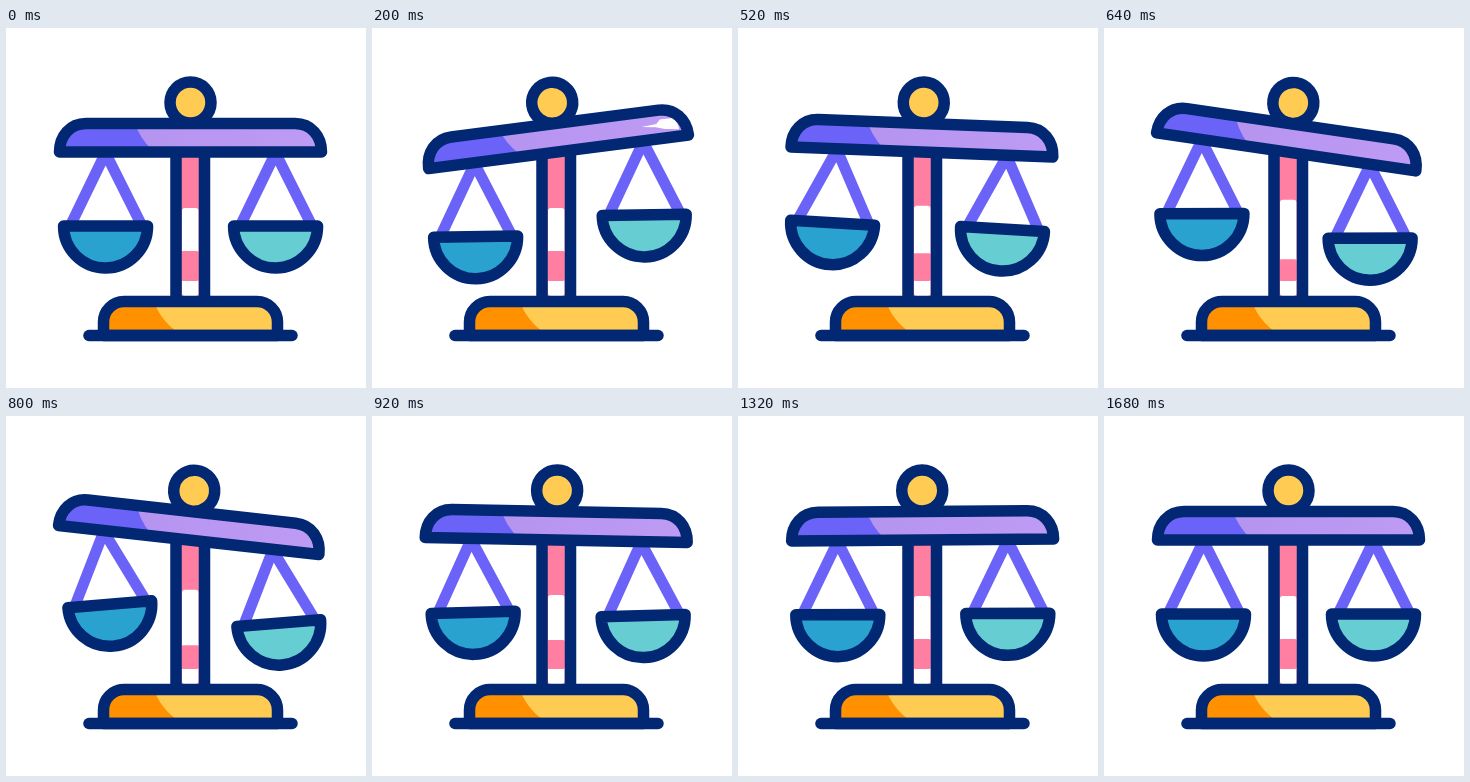
Animation of 360x360 px, one loop 1720 ms. Source, as an HTML page:

```html
<!DOCTYPE html>
<html lang="en">
<head>
<meta charset="utf-8">
<title>Balance scale</title>
<style>
  html, body { margin: 0; width: 100%; height: 100%; overflow: hidden; background: #fff; }
  svg { display: block; width: 100vw; height: 100vh; }
  .line { stroke: #022873; stroke-width: 11.5; stroke-linejoin: round; stroke-linecap: round; }
  .string { fill: none; stroke: #6b63f8; stroke-width: 11; }
</style>
</head>
<body>
<svg viewBox="0 0 360 360">
  <defs>
    <linearGradient id="lilac"><stop offset=".3" stop-color="#b594f0"/><stop offset="1" stop-color="#be9bf4"/></linearGradient>
    <clipPath id="beamClip"><path id="beamShape" d="M53.5 124C53.5 108 64 95.5 80 95.5H289C305 95.5 315.5 108 315.5 124Z"/></clipPath>
    <clipPath id="baseClip"><path id="baseShape" d="M97.5 307.5V294A20.5 20.5 0 0 1 118 273.5H251A20.5 20.5 0 0 1 271.5 294V307.5Z"/></clipPath>
    <g id="hanger">
      <path class="string" d="M-34.5 69L0 -2L35.5 69"/>
      <path class="line" d="M-42 71H42A42 42 0 0 1 -42 71Z"/>
    </g>
  </defs>

  <path d="M170 124H198.5V273H170Z" fill="#ff7fa3"/>
  <rect id="gleam" x="176" width="16.5" rx="3" fill="#fff"/>
  <rect id="band" x="175" width="18" fill="#ff7fa3"/>
  <path class="line" d="M170 124V273M198.5 124V273"/>

  <use href="#baseShape" fill="#ffcb52"/>
  <path d="M90 270H147Q153 292 174 306H90Z" fill="#ff9000" clip-path="url(#baseClip)"/>
  <use href="#baseShape" class="line" fill="none"/>
  <path class="line" d="M83 307.5H286"/>

  <use class="pan" href="#hanger" fill="#2aa2d0"/>
  <use class="pan" href="#hanger" fill="#66cdd2"/>

  <g id="beam">
    <use href="#beamShape" fill="url(#lilac)"/>
    <path d="M50 92H128Q132 108 146 122H50Z" fill="#6b63f8" clip-path="url(#beamClip)"/>
    <path id="glint" d="M270 110L285 109L289 105H302Q307 110 307 117L293 115L284 112Z" fill="#fff"/>
    <use href="#beamShape" class="line" fill="none"/>
    <circle class="line" cx="184.5" cy="74.5" r="20.5" fill="#ffcb52"/>
  </g>
</svg>
<script>
const LOOP = 1720, STEP = 40;
const PIVOT = { x: 184, y: 108 };
const HOOKS = [{ x: 99.5, y: 127 }, { x: 269.5, y: 127 }];

// Turning points of the beam: [time in ms, degrees]
const TURNS = [[60, 0], [280, -10.4], [680, 8.8], [1080, -3], [1400, 0]];

const $ = id => document.getElementById(id);
const beam = $("beam"), gleam = $("gleam"), band = $("band"), glint = $("glint");
const pans = document.querySelectorAll(".pan");

const smooth = u => (1 - Math.cos(Math.PI * u)) / 2;

function tiltAt(t) {
  const next = TURNS.findIndex(turn => turn[0] > t);
  if (next < 1) return 0;
  const [t0, from] = TURNS[next - 1], [t1, to] = TURNS[next];
  return from + (to - from) * smooth((t - t0) / (t1 - t0));
}

// The pans sway in a wave that swells and dies away
function swayAt(t) {
  return 4.9 * Math.exp(-(((t - 724) / 407) ** 2)) * Math.cos(Math.PI * (t - 470) / 330);
}

function rotated(point, degrees) {
  const angle = degrees * Math.PI / 180, c = Math.cos(angle), s = Math.sin(angle);
  const dx = point.x - PIVOT.x, dy = point.y - PIVOT.y;
  return { x: PIVOT.x + dx * c - dy * s, y: PIVOT.y + dx * s + dy * c };
}

function setAttrs(node, attrs) {
  for (const name in attrs) node.setAttribute(name, attrs[name]);
}

function draw(now) {
  let t = Math.floor((now % LOOP) / STEP) * STEP;
  if (t < 2 * STEP) t = 0;

  const tilt = tiltAt(t), sway = swayAt(t);
  setAttrs(beam, { transform: `rotate(${tilt} ${PIVOT.x} ${PIVOT.y})` });
  pans.forEach((pan, i) => {
    const hook = rotated(HOOKS[i], tilt);
    setAttrs(pan, { transform: `translate(${hook.x} ${hook.y}) rotate(${sway})` });
  });

  // The gleam on the post widens as the beam dips to the right
  const dip = Math.max(0, tilt), top = 180 - dip, bandTop = 223 + dip;
  setAttrs(gleam, { y: top, height: 268 - top });
  setAttrs(band, { y: bandTop, height: 253 - bandTop, rx: 2 });
  setAttrs(glint, { visibility: tilt < -7 ? "visible" : "hidden" });
}

function tick() {
  draw(performance.now());
  requestAnimationFrame(tick);
}
tick();
</script>
</body>
</html>
```
